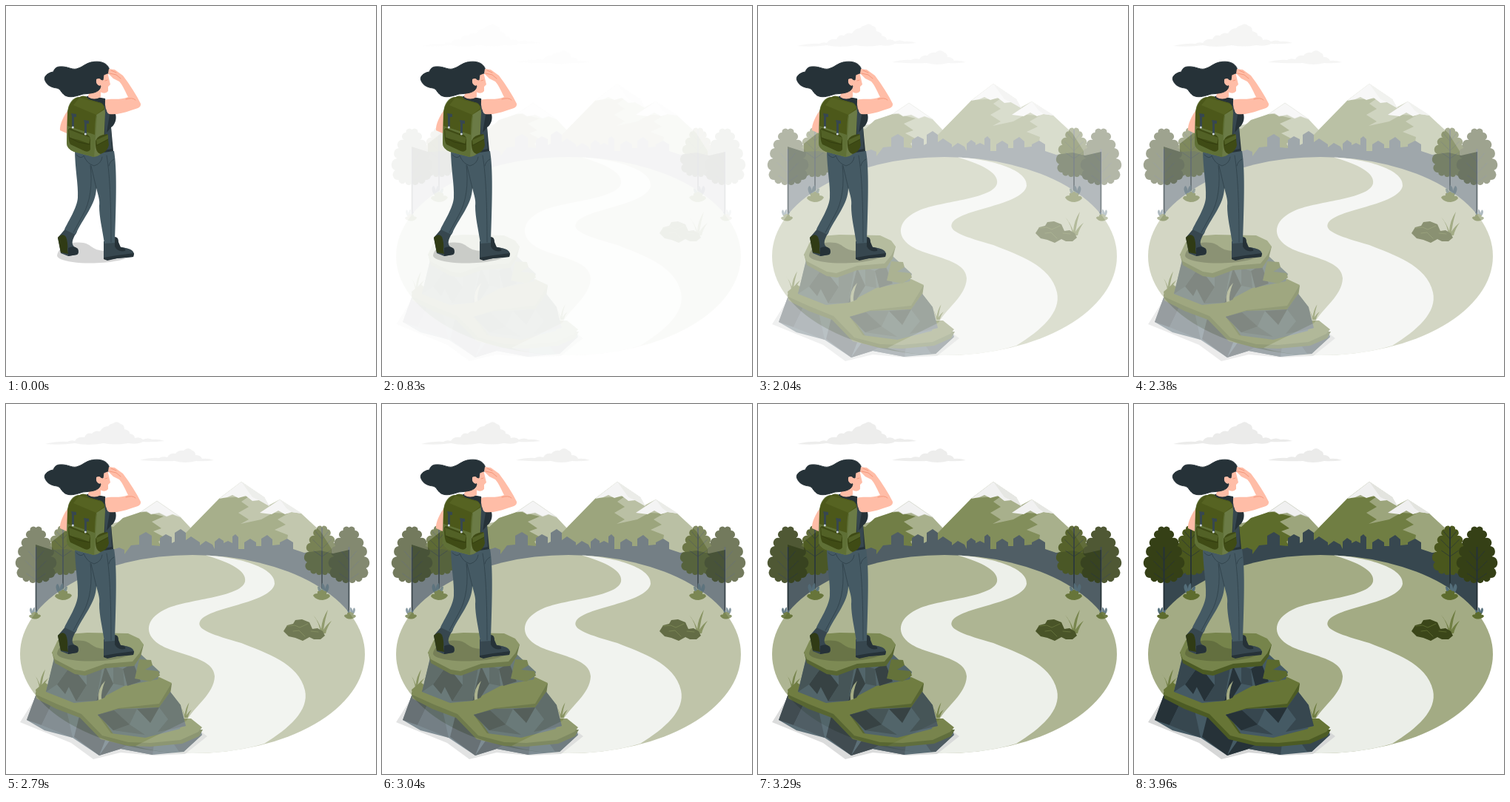
Recreate the animation shown at these times as an HTML page. Size 500 px wide and 500 px high, loop 4 s.

```html
<!DOCTYPE html>
<html lang="en">
<head>
<meta charset="utf-8">
<title>Hiker looking over a valley</title>
<style>
  html, body { margin: 0; width: 100%; height: 100%; overflow: hidden; background: #fff; }
  svg { display: block; width: 100vw; height: 100vh; }
  .fade { opacity: var(--shown, 0); }
  .line { fill: none; stroke-linecap: round; stroke-linejoin: round; }
</style>
</head>
<body>
<svg id="scene" viewBox="0 0 500 500">
  <defs>
    <path id="foliage"/>
    <g id="branches" class="line" stroke="#263238">
      <path stroke-width="2" d="M0 288V194"/>
      <path stroke-width=".8" d="M0 226l-14-14M0 226l14-14M0 211l-10-12M0 211l10-12M0 238l-13-9M0 238l13-9"/>
    </g>
    <g id="bush">
      <path fill="#546e7a" d="M-5 9C-10 2-9-3-6-4-4-1-4 0-3 3-3-2-1-4 1-5 2 0 1 3 1 5Q4-1 7 0 7 6 2 10Z"/>
      <path fill="#5d6c2d" d="M-10 13Q-9 9-5 10-6 5-2 6 1 2 4 6 8 5 7 9 12 9 13 12 9 18 0 18-7 17-10 13Z"/>
    </g>
    <g id="grove">
      <use href="#foliage" fill="#4a571d" transform="translate(77 20.600) scale(.87)"/>
      <use href="#branches" transform="translate(77 -1) scale(.87)"/>
      <use href="#bush" transform="translate(76 247)"/>
      <use href="#foliage" fill="#354016" transform="translate(40.500 0)"/>
      <use href="#branches" transform="translate(40.500 0)"/>
      <use href="#bush" transform="translate(38 278) scale(.7)"/>
    </g>
    <path id="grass" d="M0 0Q-1-14-10-25-3-17 1-6 2-20 10-32 6-19 4-5 9-13 15-17 9-9 7 0Z"/>
  </defs>

  <g class="fade" fill="#ebebea">
    <path d="M53 54Q70 50 83 51 88 48 93 50 96 44 106 45 109 38 116 40 120 35 127 37 131 30 138 30 140 27 145 26 150 22 155 27 160 28 160 34 168 36 167 40 174 41 174 46 181 44 185 48 192 45 198 48 206 47 214 50 198 52 185 51 178 55 165 53 148 56 132 53 110 57 93 53 74 56 53 54Z"/>
    <path d="M181 76Q195 72 207 73 211 70 218 72 221 66 229 67 233 62 240 63 246 57 252 63 256 64 256 69 263 69 265 74 273 73 281 76 268 78 257 77 242 81 228 77 210 78 181 76Z"/>
  </g>

  <g class="fade">
    <path fill="#9ca57c" d="M85 205V172L150 160 182 146 204 131 236 153 250 168V205Z"/>
    <path fill="#5d6c2b" d="M62 205V186L85 168 110 158 145 166 158 154 185 145 197 148 213 152 197 159 210 168 199 172 214 180 206 186 218 205Z"/>
    <path fill="#f0f0f0" stroke="#c9cdc0" stroke-width=".5" d="M182 146 204 131 236 153 225 149 217 152 207 147 196 149 190 145Z"/>
    <path fill="#9ca57c" d="M235 215V185L250 167 289 127 318 105 349 126 355 137 370 129 398 147 425 172 440 196V215Z"/>
    <path fill="#707e43" d="M235 215V182L250 167 289 127 328 125 318 132 328 139 314 147 328 156 317 162 345 156 361 147 381 148 367 156 378 163 363 170 381 177 375 215Z"/>
    <path fill="#f0f0f0" d="M288 128 318 105 349 126 356 138 342 130 333 131 324 124 314 127 306 123 299 126ZM343 147 370 129 400 148 386 146 377 149 368 144 359 149Z"/>
    <path fill="#e3e4df" d="M318 105 349 126 356 138 342 130 333 126ZM370 129 400 148 386 146 379 141Z"/>
    <path fill="#37474f" d="M40 284V190L62 197 82 196 104 202H125V196H147L153 194 160 197V203L169 191 180 190V178L189 173 197 178V191L208 192V181L216 176 224 180V188L228 186V174L236 169 243 174V184L250 179 262 187V191L270 185 279 190 282 196V186L288 181 294 185V188L300 185 306 188V179L310 176 314 180V196H322V187L330 182 338 187V192H345V182L353 177 360 183V191L370 190V187L380 182 388 187V196L403 201 425 198 442 202 464 197V284A233 134 0 0 0 40 284Z"/>
    <ellipse cx="252" cy="338" rx="233" ry="134" fill="#a3ab84"/>
    <path fill="#ebeee8" d="M270 204.400C304 214 326 226 323 240 317 262 244 263 214 278 188 291 187 311 206 324 230 340 281 341 282 368 281 392 255 408 244 428L175 462Q205 472 252 472 306 472 349 459C383 438 410 414 404 387 396 350 350 336 318 323 280 312 257 305 262 294 271 274 358 270 363 243 365 222 318 207 270 204.400Z"/>
  </g>

  <use class="fade" href="#grove"/>
  <use class="fade" href="#grove" transform="matrix(-1 0 0 1 504 0)"/>

  <g class="fade">
    <use href="#grass" fill="#707e43" transform="translate(425 310)"/>
    <path fill="#3b4619" d="M375 307 380 299 388 297 391 292 400 291 410 295 414 304 421 303 428 307 431 313 425 318 416 318 410 315 401 320 391 316 382 314Z"/>
    <path class="line" stroke="#59672d" stroke-width="1" d="M380 300 390 299 397 302 408 297M388 307 396 306 404 314M412 307 422 308"/>
  </g>

  <g class="fade">
    <path fill="#d6d7d7" d="M19 430 40 397 130 400 240 425 272 449 242 473 200 475 155 471 118 480 88 458Z"/>
    <g fill="#707e43">
      <use href="#grass" transform="translate(45 384) scale(.8)"/>
      <use href="#grass" transform="translate(241 424) scale(.65)"/>
    </g>
    <path fill="#455a64" d="M40 394 28 427 52 441 90 451 126 475 155 466 198 474 240 470 265 447 262 438 100 395Z"/>
    <path fill="#263238" d="M40 394 28 427 48 434 62 405ZM100 418 92 450 126 475 135 452ZM140 455 126 475 155 466 168 459Z"/>
    <path fill="#37474f" d="M62 405 48 434 90 451 82 414ZM168 458 155 466 198 474 200 459ZM225 457 234 470 240 470 265 447Z"/>
    <path fill="#4c5b24" d="M40 390 52 380 66 389 105 403 150 384 206 370 224 378 222 392 207 412 155 415 130 424 145 446 188 452 238 440 266 440 261 449 238 459 195 463 165 462 128 453 100 424 68 412 41 398Z"/>
    <path fill="#677536" d="M40 386 52 376 66 386 105 401 150 382 207 369 224 377 207 405 152 411 124 420 142 445 188 451 235 439 238 425 250 425 265 437 260 443 236 454 195 458 165 457 130 448 102 419 70 406 41 393Z"/>
    <path fill="#455a64" d="M124 420 152 412 207 410 222 389 236 407 237 427 243 435 226 439 190 447 145 441Z"/>
    <path fill="#37474f" d="M152 412 177 412 167 433 188 447 145 441 124 420ZM207 410 219 426 205 443 226 439 243 435 236 407 222 389Z"/>
    <path fill="#263238" d="M146 414 167 433 145 441 124 420ZM177 412 207 410 195 431Z"/>
    <path fill="#455a64" d="M65 343 54 389 92 404 122 401 160 381 205 372 208 362 182 338Z"/>
    <path fill="#263238" d="M84 358 69 379 80 392 95 362ZM95 362 82 377 95 402 109 380ZM134 354 122 401 133 397 145 378ZM172 350 158 358 164 381 182 375Z"/>
    <path fill="#37474f" d="M65 345 54 389 69 379 84 358ZM109 364 109 380 95 402 122 401 130 356ZM145 354 145 378 160 381 158 358Z"/>
    <path fill="#5a692d" d="M180 345 196 346 198 353 188 359 206 361 208 367 195 375 174 371Z"/>
    <path fill="#4c5b24" d="M62 335 66 350 93 365 107 367 134 357 173 354 182 341 186 325Z"/>
    <path fill="#76844b" d="M62 336 70 319 84 311 110 309 165 310 180 317 186 325 180 337 171 348 134 351 106 361 93 359 66 345Z"/>
    <path fill="#a3ab84" d="M125 400Q123 385 134 374 128 389 129 399Z"/>
  </g>

  <path fill="#000" opacity=".16" d="M69 337C70 329 80 321 91 320 119 317 110 331 136 331L172 335C165 346 117 350 90 346 76 344 69 341 69 337Z"/>

  <g id="hiker">
    <path fill="#ffbda7" d="M85 139C78 148 72 161 73 168L82 172 90 150Z"/>
    <path fill="#37474f" d="M82 299 96 305C89 316 86 324 97 328Q99 334 96 336L84 338 74 334 70 313Z"/>
    <path fill="#303b15" d="M70 313Q77 306 81 312 84 320 83 329L84 335 74 333Z"/>
    <path fill="#263238" d="M84 327Q92 323 97 328 99 334 96 336L84 338Z"/>
    <path fill="#37474f" d="M132 318 147 318 152 325C159 327 172 327 173 335L172 339 150 341 137 343 132 342Z"/>
    <path fill="#263238" d="M147 312Q152 312 152 319L155 326Q163 327 161 331 151 333 147 325ZM132 340 150 337 173 334 172 339 150 341 137 344 132 342Z"/>
    <path fill="#455a64" d="M93 193 146 196C150 220 149 260 147 320L133 321C130 300 126 286 126 270 127 263 125 257 122 246 122 268 104 286 94 309L79 302C84 291 96 273 97 259 98 241 93 220 93 193Z"/>
    <path class="line" stroke="#2f414a" stroke-width=".8" d="M114 215C117 240 114 265 104 282L91 306M122 246 115 216M136 202C141 230 142 280 142 319M95 201Q102 208 105 202 109 213 119 216 129 213 130 204M146 207Q140 210 139 216"/>
    <path fill="#263238" d="M103 125 112 121 134 125 137 145 148 146C150 153 147 161 142 164L145 196 120 200Z"/>
    <path fill="#37474f" d="M133 129Q134 143 140 147L136 171 142 164 143 193 134 195Z"/>
    <path fill="#ffbda7" d="M112 118 128 108 128 123Q119 128 111 123ZM123 97 137 89 141 106 138 109 138 115Q134 120 127 116Z"/>
    <path fill="#263238" stroke="#263238" d="M140 91C141 78 129 73 115 76 107 78 104 82 98 84 90 88 84 81 73 82 67 82 65 86 64 89 56 90 50 96 53 101 56 108 62 110 69 111 74 112 74 117 80 121 88 125 97 121 104 119 114 118 127 118 128 108L122 104 123 98 131 100 132 93 137 91Z"/>
    <path fill="#ffbda7" d="M122 99Q128 96 129 102L127 108Q121 107 122 99Z"/>
    <path fill="#ffbda7" d="M134 127C143 124 153 128 165 123 160 113 157 106 153 102L145 98 138 91 139 85 147 86 158 94C168 107 176 120 182 132 183 138 175 139 169 141 158 145 149 147 139 146Q133 140 134 127Z"/>
    <path class="line" stroke="#f28f72" stroke-width=".8" d="M162 126Q171 123 175 127M140 91 149 93 155 98M142 87 149 90M134 101 137 100"/>

    <path fill="#4c5a1c" d="M97 125Q101 120 108 122L112 126Z"/>
    <path fill="#6b7b46" d="M83 146C83 131 91 123 99 123L128 131Q134 134 134 144L132 190Q131 203 118 204L92 197Q82 193 82 185Z"/>
    <path fill="#5f7036" d="M83 146C84 132 91 124 99 123L123 148 119 204 92 197Q82 193 82 185Z"/>
    <path fill="#4c581a" d="M83 148C84 132 92 123 101 123L129 131Q134 135 133 140L122 147Q120 157 120 174L83 162Z"/>
    <path fill="#566322" d="M99 124 129 132Q133 135 132 139L122 147 91 134Z"/>
    <path fill="#3f4b15" d="M84 167Q86 163 91 167L110 174Q115 176 114 184V194Q111 199 104 195L87 187Q84 183 84 167ZM121 182Q124 174 137 173L139 188Q137 197 128 200 120 198 121 182Z"/>
    <path fill="#526126" d="M85 167 114 178 112 186 98 181 86 178ZM122 181 138 174 138 180 123 188Z"/>
    <path class="line" stroke="#2e380e" stroke-width=".7" d="M86 178 98 184 113 187M123 188 138 180"/>
    <g id="strap">
      <path fill="#37474f" d="M88 145 95 146 95 150 92 150 92 165 89 163 89 149Z"/>
      <circle cx="90.300" cy="164" r="1.500" fill="#cfd8dc"/>
    </g>
    <use href="#strap" x="17" y="9"/>
  </g>
</svg>
<script>
  const LOOP = 4000;
  // [time in ms, opacity of the landscape]
  const FADE = [[200, 0], [830, 0.05], [1330, 0.15], [1500, 0.205], [2380, 0.475],
    [2790, 0.61], [3250, 0.755], [3270, 0.865], [3960, 1]];

  // Right half of the crown, as offset from the trunk and height
  const CROWN = [[0, 167], [8, 171], [11, 181], [18, 192], [20, 206],
    [23, 222], [18, 235], [9, 238], [0, 239]];

  function scallops(points) {
    return points.map(([x, y], i) => {
      if (!i) return `M${x} ${y}`;
      const [px, py] = points[i - 1];
      const r = Math.hypot(x - px, y - py) * 0.52;
      return `A${r} ${r} 0 0 1 ${x} ${y}`;
    }).join("") + "Z";
  }

  function opacityAt(time) {
    if (time <= FADE[0][0]) return 0;
    const i = FADE.findIndex(([t]) => t > time);
    if (i < 0) return 1;
    const [t0, a] = FADE[i - 1], [t1, b] = FADE[i];
    return a + (b - a) * (time - t0) / (t1 - t0);
  }

  const scene = document.getElementById("scene");
  const leftHalf = CROWN.slice(0, -1).reverse().map(([x, y]) => [-x, y]);
  document.getElementById("foliage").setAttribute("d", scallops([...CROWN, ...leftHalf]));

  const start = performance.now();
  function draw() {
    const time = (performance.now() - start) % LOOP;
    scene.style.setProperty("--shown", opacityAt(time));
    requestAnimationFrame(draw);
  }
  draw();
</script>
</body>
</html>
```
